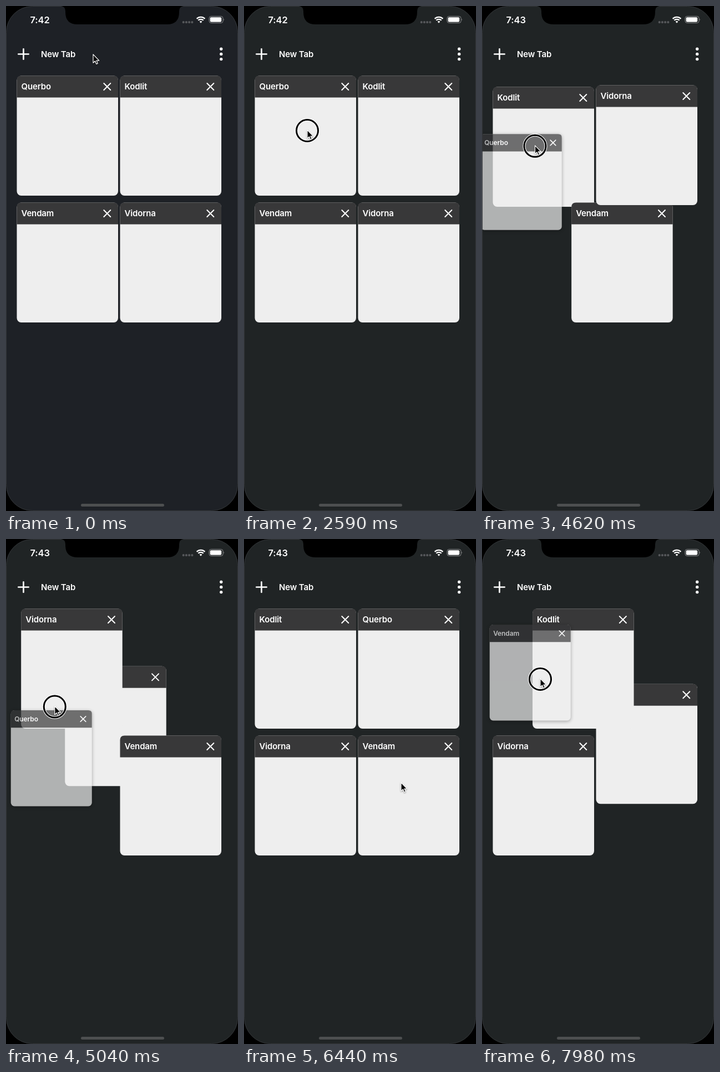
Animation of 418x908 px, one loop 8 s. Source, as an HTML page:

```html
<!DOCTYPE html>
<html lang="en">
<head>
<meta charset="utf-8">
<title>Tab grid</title>
<style>
  html, body { margin: 0; width: 100%; height: 100%; overflow: hidden; background: #000; }
  svg { display: block; width: 100%; height: 100%; }
  text { font: 600 15px Inter, "Liberation Sans", sans-serif; letter-spacing: -.15px; fill: #fff; }
  .clock { font-size: 16.5px; letter-spacing: -.1px; }
  .line { fill: none; stroke: #fff; stroke-linecap: round; }
  .dots { fill: none; stroke-linecap: round; }
</style>
</head>
<body>
<svg viewBox="0 0 418 908">
  <defs>
    <clipPath id="edge"><rect x="1" y="1" width="416" height="906" rx="47"/></clipPath>
  </defs>
  <rect width="418" height="908"/>
  <rect id="back" x=".5" y=".5" width="417" height="907" rx="47" stroke="#34373a"/>

  <g clip-path="url(#edge)">
    <path class="line" stroke-width="2.7" d="M22.3 86.5H40.7M31.5 77.3V95.7"/>
    <text x="63" y="91.7">New Tab</text>
    <path class="dots" stroke="#fff" stroke-width="5.4" d="M387.7 77.2v0M387.7 86.4v0M387.7 95.6v0"/>
    <g id="cards"></g>
    <rect x="135" y="895" width="150" height="5" rx="2.5" fill="#4d4f50"/>
  </g>

  <path d="M99 0Q107 1 107 9V11Q107 33 129 33H290Q312 33 312 11V9Q312 1 320 0Z"/>
  <text id="clock" class="clock" x="43.5" y="30.8"></text>
  <path class="dots" stroke="#55575a" stroke-width="4.2" d="M319.7 29.2h0M324.9 29.2h0M330.1 29.2h0M335.3 29.2h0"/>
  <path fill="none" stroke="#fff" stroke-width="2.3"
    d="M343.6 22.9A10.5 10.5 0 0 1 358.4 22.9M346.3 25.8A6.6 6.6 0 0 1 355.7 25.8"/>
  <path fill="#fff" d="M348.6 28A3.8 3.8 0 0 1 353.4 28L351 30.8Z"/>
  <rect x="366" y="18.5" width="25" height="12" rx="3.6" fill="none" stroke="#8a8c8e"/>
  <rect x="367.7" y="20.2" width="20.5" height="8.6" rx="2" fill="#fff"/>
  <path d="M392.2 22.7Q394 24.5 392.2 26.3Z" fill="#8a8c8e"/>

  <g id="pointer">
    <g id="ring" fill="none">
      <circle r="19.5" stroke="#fff" stroke-width="5"/>
      <circle r="19.5" stroke="#000" stroke-width="3"/>
    </g>
    <path d="M0 -1V14.2L3.5 11L5.9 16.4L8.3 15.3L6 10.1H10.8Z" stroke="#fff" stroke-width="1.2"
      stroke-linejoin="round" style="filter:drop-shadow(0 1px 1px #0006)"/>
  </g>
</svg>

<script>
(() => {
  const LOOP = 8000, MOVE = 400, LAG = 80, LIFT = 220;
  const W = 182.5, H = 215.5;
  const names = ["Querbo", "Kodlit", "Vendam", "Vidorna"];

  // key points of the pointer: time, x, y
  const path = [
    [210, 157, 88], [640, 95, 222], [840, 95, 222], [1200, 155, 221],
    [1610, 155, 221], [2310, 114, 224], [3600, 114, 224],
    [3770, 231, 227], [3850, 237, 228], [4180, 325, 310], [4430, 80, 400],
    [4540, 74, 308], [4620, 95, 252], [4780, 330, 235], [4960, 85, 385],
    [5120, 95, 215], [5380, 287, 193], [5460, 263, 198],
    [6160, 276, 215], [6400, 283, 439], [7400, 283, 439],
    [7690, 255, 270], [7900, 73, 218], [7980, 105, 252]
  ];

  // hover: when the dragged card swaps places with which slot
  const drags = [
    { card: 0, press: 2590, lift: 3200, drop: 6100, hover: [[3820, 1], [4288, 3], [4348, 2],
      [4548, 0], [4690, 1], [4850, 2], [5050, 0], [5268, 1]] },
    { card: 2, press: 6790, lift: 7260, drop: LOOP + LIFT, hover: [[7756, 1], [7812, 0]] }
  ];
  const presses = [{ press: 1190, drop: 1610 }, ...drags];

  const $ = id => document.getElementById(id);
  const clamp = v => Math.min(1, Math.max(0, v));
  const ease = v => (v = clamp(v), v * v * (3 - 2 * v));
  const mix = (a, b, k) => a + (b - a) * k;
  const mix2 = (a, b, k) => [mix(a[0], b[0], k), mix(a[1], b[1], k)];
  const slotAt = s => [19.5 + 186 * (s % 2), 125.5 + 228 * (s >> 1)];

  // smooth curve through the points that never overshoots them
  function slope(i, c) {
    if (i < 1 || i > path.length - 2) return 0;
    const rate = j => (path[j + 1][c] - path[j][c]) / (path[j + 1][0] - path[j][0]);
    const a = rate(i - 1), b = rate(i);
    return a * b <= 0 ? 0 : 2 * a * b / (a + b);
  }
  function pointerAt(t) {
    const next = path.findIndex(p => p[0] > t);
    if (next < 0) return path[path.length - 1].slice(1);
    if (next === 0) return path[0].slice(1);
    const i = next - 1, p = path[i], q = path[next];
    const d = q[0] - p[0], u = (t - p[0]) / d;
    return [1, 2].map(c => mix(p[c], q[c], ease(u))
      + d * u * (1 - u) * ((1 - u) * slope(i, c) - u * slope(next, c)));
  }

  // replay the swaps to get every card's list of [time, slot]
  const moves = names.map((_, i) => [[-MOVE, i]]);
  const slots = [0, 1, 2, 3];
  for (const d of drags) {
    d.home = slotAt(slots.indexOf(d.card));
    d.from = pointerAt(d.lift);
    for (const [t, s] of d.hover) {
      const old = slots.indexOf(d.card), other = slots[s];
      slots[old] = other;
      slots[s] = d.card;
      moves[other].push([t, old]);
      moves[d.card].push([t, s]);
    }
  }
  function restAt(card, t, k = moves[card].length - 1) {
    const list = moves[card];
    while (k > 0 && list[k][0] > t) k--;
    const [start, s] = list[k];
    if (!k) return slotAt(s);
    return mix2(restAt(card, start, k - 1), slotAt(s), ease((t - start) / MOVE));
  }

  const cards = names.map(name => {
    const g = document.createElementNS("http://www.w3.org/2000/svg", "g");
    g.innerHTML = `<rect width="${W}" height="${H}" rx="8" fill="#eee"/>
      <path d="M0 39V8Q0 0 8 0H${W - 8}Q${W} 0 ${W} 8V39Z" fill="#383839"/>
      <text x="8" y="24.8">${name}</text>
      <path class="line" stroke-width="2" d="M156.8 13.5l12 12m0 -12l-12 12"/>`;
    return g;
  });

  let raised;
  function raise(card) {
    if (card === raised) return;
    raised = card;
    $("cards").append(...cards);
    if (card !== null) $("cards").append(cards[card]);
  }

  function draw(t) {
    $("pointer").setAttribute("transform", `translate(${pointerAt(t)})`);
    $("ring").style.display = presses.some(p => t >= p.press && t < p.drop) ? "" : "none";
    $("clock").textContent = t < 4200 ? "7:42" : "7:43";
    $("back").setAttribute("fill", t < 840 ? "#1e2126" : "#202425");

    const drag = drags.find(d => t > d.lift && t < d.drop + LIFT);
    raise(drag ? drag.card : null);
    cards.forEach((g, i) => {
      let pos = restAt(i, t), k = 0;
      if (drag && drag.card === i) {
        k = ease((t - drag.lift) / LIFT) * (1 - ease((t - drag.drop) / LIFT));
        const late = pointerAt(Math.min(t, drag.drop) - LAG);
        const held = drag.home.map((v, c) => v + late[c] - drag.from[c]);
        pos = mix2(pos, held, k);
      }
      const s = 1 - .2 * k;
      const x = pos[0] + W * (1 - s) / 2, y = pos[1] + H * (1 - s) / 2;
      g.setAttribute("transform", `translate(${x} ${y}) scale(${s})`);
      g.style.opacity = 1 - .3 * k;
      g.style.filter = k ? `drop-shadow(0 2px 4px rgba(0,0,0,${.45 * k}))` : "none";
    });
  }

  const begin = performance.now();
  function tick() {
    draw((performance.now() - begin) % LOOP);
    requestAnimationFrame(tick);
  }
  tick();
})();
</script>
</body>
</html>
```
